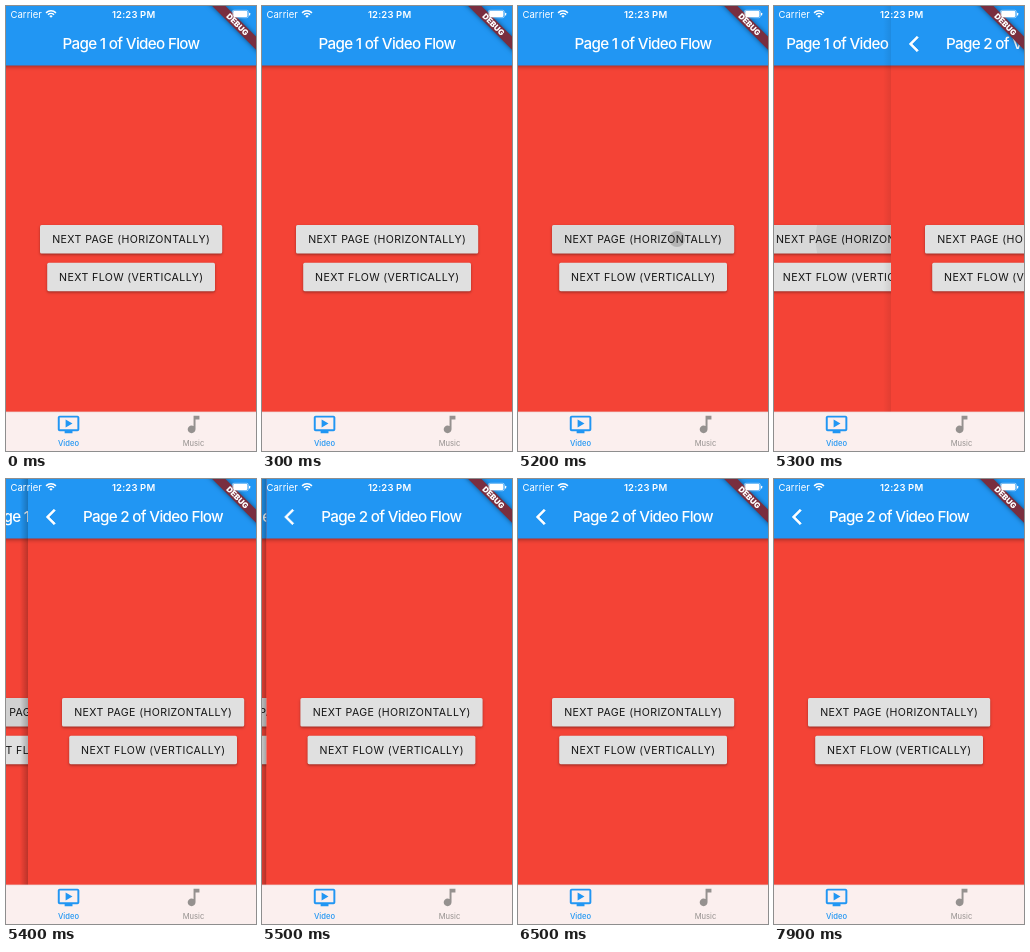
Animation of 250x445 px, one loop 8 s. Source, as an HTML page with a canvas:

```html
<!DOCTYPE html>
<html lang="en">
<head>
<meta charset="utf-8">
<title>Page flow</title>
<style>
  html, body { margin: 0; width: 100%; height: 100%; overflow: hidden; }
  canvas { display: block; width: 250px; height: 445px; }
</style>
</head>
<body>
<canvas id="stage"></canvas>
<script>
const W = 250, H = 445, LOOP = 8000, STEP = 100;
const BLUE = '#2196f3', RED = '#f44336', GREY = '#95918f';
const FONT = 'Inter, "Open Sans", sans-serif';
const PUSH = 5300;
// Left edge of the incoming page, one value per step
const SLIDE = [117, 22, 4.4, 1.8, 0.8, 0.4, 0.2];
const TAP = { x: 159, y: 233 };

const canvas = document.getElementById('stage');
const ctx = canvas.getContext('2d');
const dpr = window.devicePixelRatio || 1;
canvas.width = W * dpr;
canvas.height = H * dpr;

const icons = {
  video: new Path2D('M21 3H3c-1.11 0-2 .89-2 2v12c0 1.1.89 2 2 2h5v2h8v-2h5c1.1 0 1.99-.9 1.99-2L23 5c0-1.11-.9-2-2-2zm0 14H3V5h18v12zm-5-6l-7 4V7z'),
  music: new Path2D('M12 3v10.55c-.59-.34-1.27-.55-2-.55-2.21 0-4 1.79-4 4s1.79 4 4 4 4-1.79 4-4V7h4V3h-6z'),
  back: new Path2D('M11.67 3.87L9.9 2.1 0 12l9.9 9.9 1.77-1.77L3.54 12z')
};

function text(str, x, y, size, weight, color, spacing = 0, align = 'center') {
  ctx.font = `${weight} ${size}px ${FONT}`;
  ctx.letterSpacing = spacing + 'px';
  ctx.textAlign = align;
  ctx.fillStyle = color;
  ctx.fillText(str, x, y);
}

function rect(x, y, w, h, color) {
  ctx.fillStyle = color;
  ctx.fillRect(x, y, w, h);
}

function roundRect(x, y, w, h, r) {
  ctx.beginPath();
  ctx.roundRect(x, y, w, h, r);
}

function shadow(alpha, blur, dy) {
  ctx.shadowColor = `rgba(0,0,0,${alpha})`;
  ctx.shadowBlur = blur * dpr;
  ctx.shadowOffsetY = dy * dpr;
}

function icon(path, x, y, color, scale = 0.98, outline = 0) {
  ctx.save();
  ctx.translate(x, y);
  ctx.scale(scale, scale);
  ctx.fillStyle = ctx.strokeStyle = color;
  ctx.fill(path, 'evenodd');
  if (outline) {
    ctx.lineWidth = outline;
    ctx.stroke(path);
  }
  ctx.restore();
}

function button(label, x, y, w, ripple) {
  const h = 28.4;
  ctx.save();
  shadow(0.36, 2.6, 1.2);
  ctx.fillStyle = '#e0e0e0';
  roundRect(x, y, w, h, 1.6);
  ctx.fill();
  ctx.restore();
  if (ripple) {
    ctx.save();
    roundRect(x, y, w, h, 1.6);
    ctx.clip();
    rect(x, y, w, h, 'rgba(0,0,0,0.035)');
    ctx.fillStyle = `rgba(0,0,0,${ripple.alpha})`;
    ctx.beginPath();
    ctx.arc(TAP.x, TAP.y, ripple.radius, 0, Math.PI * 2);
    ctx.fill();
    ctx.restore();
  }
  text(label, x + w / 2 + 0.2, y + 18, 10.6, 400, '#141414', 0.38);
}

function page(number, x, ripple) {
  ctx.save();
  ctx.translate(x, 0);
  rect(0, 0, W, H, RED);
  ctx.save();
  ctx.beginPath();
  ctx.rect(0, 0, W, H);
  ctx.clip();
  shadow(0.32, 4, 1.3);
  rect(-10, -10, W + 20, 69.5, BLUE);
  ctx.restore();
  text(`Page ${number} of Video Flow`, 125, 43, 15.2, 500, '#fff', -0.67);
  if (number > 1) icon(icons.back, 18.2, 28.6, '#fff', 0.78, 0.9);
  button('NEXT PAGE (HORIZONTALLY)', 34, 219.1, 182.2, ripple);
  button('NEXT FLOW (VERTICALLY)', 41.2, 256.8, 167.8);
  ctx.restore();
}

// Darkens as the page settles
function edgeShadow(x) {
  const alpha = 0.28 * (1 - x / W) ** 2;
  const g = ctx.createLinearGradient(x - 8, 0, x, 0);
  g.addColorStop(0, 'rgba(0,0,0,0)');
  g.addColorStop(1, `rgba(0,0,0,${alpha})`);
  rect(x - 8, 0, 8, H, g);
}

function tabBar() {
  rect(0, 405.8, W, H - 405.8, '#fbefee');
  rect(0, 405.8, W, 0.4, '#dcc4c2');
  icon(icons.video, 50.8, 406.7, BLUE);
  text('Video', 62.5, 440.3, 7.6, 500, BLUE);
  icon(icons.music, 175.8, 406.7, GREY);
  text('Music', 187.5, 440.3, 7.6, 400, GREY);
}

function banner() {
  ctx.save();
  ctx.translate(W, 0);
  ctx.rotate(Math.PI / 4);
  ctx.save();
  shadow(0.5, 5, 0);
  rect(-40, 21.6, 80, 9.4, 'rgb(121,46,63)');
  ctx.restore();
  text('DEBUG', 0, 28.9, 7.9, 900, '#fff');
  ctx.restore();
}

function statusBar() {
  text('Carrier', 4.5, 11.5, 9.5, 400, '#fff', 0.05, 'left');
  text('12:23 PM', 127.6, 11.5, 9.5, 600, '#fff', 0.15);

  // Wi-Fi fan
  ctx.strokeStyle = ctx.fillStyle = '#fff';
  ctx.lineWidth = 1.5;
  const from = -Math.PI * 0.75, to = -Math.PI * 0.25;
  for (const r of [4.3, 7]) {
    ctx.beginPath();
    ctx.arc(45, 11.8, r, from, to);
    ctx.stroke();
  }
  ctx.beginPath();
  ctx.moveTo(45, 11.8);
  ctx.arc(45, 11.8, 2.3, from, to);
  ctx.fill();

  // Battery
  ctx.lineWidth = 0.5;
  roundRect(226.3, 4.3, 16, 7.4, 1.6);
  ctx.stroke();
  roundRect(227.2, 5.1, 14.2, 5.8, 0.8);
  ctx.fill();
  roundRect(243, 6.7, 1.2, 2.8, 0.6);
  ctx.fill();
}

function rippleAt(t) {
  if (t < PUSH - STEP || t > PUSH + 3 * STEP) return null;
  if (t < PUSH) return { radius: 8, alpha: 0.16 };
  const k = (t - PUSH) / STEP;
  return { radius: 73 + 50 * k, alpha: 0.06 / (1 + k) };
}

function draw(t) {
  ctx.setTransform(dpr, 0, 0, dpr, 0, 0);
  const step = (t - PUSH) / STEP;
  const x = step < 0 ? W : SLIDE[step] || 0;
  if (x > 0) page(1, -(W - x) / 3, rippleAt(t));
  if (x < W) {
    if (x > 0) edgeShadow(x);
    page(2, x);
  }
  tabBar();
  banner();
  statusBar();
}

function frame() {
  const t = performance.now() % LOOP;
  draw(Math.floor(t / STEP) * STEP);
  requestAnimationFrame(frame);
}
frame();
</script>
</body>
</html>
```
